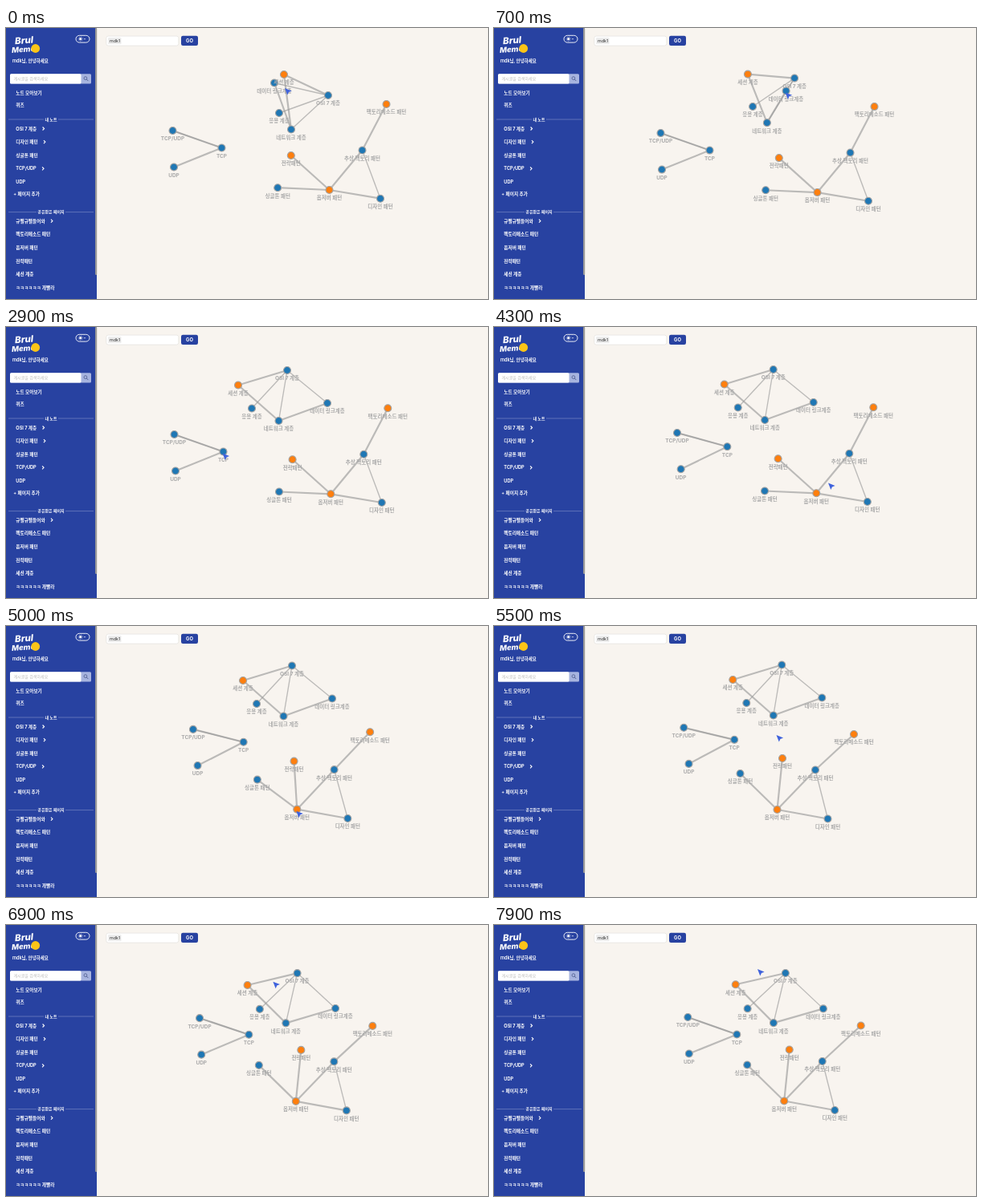
Write an HTML page that moves like this. It is 600 px wide and 338 px high and loops after 8 s.

```html
<!DOCTYPE html>
<html lang="ko">
<head>
<meta charset="utf-8">
<title>Note graph</title>
<style>
  html, body { margin: 0; width: 100%; height: 100%; overflow: hidden; background: #f8f4ef; }
  svg { display: block; width: 600px; height: 338px; }
  text { font-family: Inter, "Noto Sans CJK KR", "Noto Sans CJK", sans-serif; white-space: pre; }
</style>
</head>
<body>
<svg id="stage" viewBox="0 0 600 338" xmlns="http://www.w3.org/2000/svg"></svg>
<script>
const NS = 'http://www.w3.org/2000/svg';
const stage = document.getElementById('stage');
const LOOP = 8000, STEP = 100;
const NAVY = '#2842a1', BLUE = '#1f77b4', ORANGE = '#ff7f0e';
const THICK = 2.2, THIN = 1.35;

function add(tag, attrs, parent = stage) {
  const el = document.createElementNS(NS, tag);
  for (const key in attrs) el.setAttribute(key, attrs[key]);
  parent.appendChild(el);
  return el;
}

// y is the visual middle of the text
function label(text, x, y, size, extra = {}, parent = stage) {
  const el = add('text', { x, y: y + size * 0.37, 'font-size': size, fill: '#fff', ...extra }, parent);
  el.textContent = text;
  return el;
}

const rect = (x, y, width, height, fill, rx = 0, extra = {}) =>
  add('rect', { x, y, width, height, fill, rx, ...extra });

const bold = { 'font-weight': 700 };

function drawSidebar() {
  rect(0, 0, 113, 338, NAVY);
  rect(111, 0, 2.2, 308, '#989898', 1);

  const logo = { 'font-weight': 800, 'font-style': 'italic' };
  label('Brul', 11, 16, 11.5, { ...logo, transform: 'rotate(-4 11 16)' });
  label('Memo', 7, 27.5, 9.5, { ...logo, transform: 'rotate(-4 7 27)' });
  add('circle', { cx: 36.7, cy: 25.5, r: 5.4, fill: '#fcc417' });

  rect(87, 9.3, 17, 8.8, 'none', 4.4, { stroke: '#fff', 'stroke-width': 0.9 });
  add('circle', { cx: 92.7, cy: 13.7, r: 1.6, fill: '#fff' });
  add('circle', { cx: 92.7, cy: 13.7, r: 2.6, fill: 'none', stroke: '#fff', 'stroke-width': 0.8, 'stroke-dasharray': '.7 1.34' });
  add('path', { d: 'M97 13.7h2', stroke: '#fff', 'stroke-width': 0.7 });

  label('mdk님, 안녕하세요', 8, 41, 5.5, { 'font-weight': 600 });
  rect(5, 57.2, 101, 12.3, '#a7b4df', 1.5);
  rect(5, 57.2, 88.5, 12.3, '#fff', 1.5);
  label('게시글을 검색하세요', 9.5, 63.2, 5, { fill: '#bcbcbc' });
  add('circle', { cx: 98.9, cy: 62.6, r: 1.9, fill: 'none', stroke: '#4c5a8c', 'stroke-width': 0.8 });
  add('path', { d: 'M100.3 64l2 2', stroke: '#4c5a8c', 'stroke-width': 0.9 });

  // A trailing ">" becomes a chevron
  const menu = (y, step, items) => items.forEach((item, i) => {
    const mid = y + i * step;
    const text = label(item.replace('>', ''), 12.3, mid, 5.65, bold);
    if (!item.endsWith('>')) return;
    const x = 12.3 + text.getComputedTextLength() + 7.3;
    add('path', { d: `M${x} ${mid - 2}l2 2l-2 2`, fill: 'none', stroke: '#fff', 'stroke-width': 1.1 });
  });
  const divider = (text, y, half) => {
    add('path', { d: `M3 ${y}H${56 - half}M${56 + half} ${y}H109`, stroke: '#8493cb', 'stroke-width': 0.6 });
    label(text, 56, y, 5, { 'text-anchor': 'middle', ...bold });
  };

  menu(80.5, 15, ['노트 모아보기', '퀴즈']);
  divider('내 노트', 114, 9);
  menu(125.5, 16.6, ['OSI 7 계층>', '디자인 패턴>', '싱글톤 패턴', 'TCP/UDP>', 'UDP']);
  label('+ 페이지 추가', 9.3, 207, 5.65, { 'font-weight': 600 });
  divider('공유받은 페이지', 229.6, 18);
  menu(240.7, 16.65, ['규펠규펠들어와>', '팩토리메소드 패턴', '옵저버 패턴', '전략패턴', '세션 계층', 'ㅋㅋㅋㅋㅋㅋ 개빨라']);
}

function drawToolbar() {
  rect(124.8, 10.1, 90, 12, '#fff', 2.5, { stroke: '#e3e1dd', 'stroke-width': 0.7 });
  rect(127, 12.1, 16.5, 8, '#ececec', 1.2);
  label('mdk1', 129, 16, 5.4, { fill: '#333' });
  rect(218, 9.8, 21, 12.1, NAVY, 2.2);
  label('GO', 228.5, 16, 5.8, { 'text-anchor': 'middle', ...bold });
}

// Each cluster is a shape that travels as a whole: motion = [time, dx, dy, degrees].
// During `morph` its nodes go from their first place to their second one;
// nudges = [node, time, span, dx, dy] pull one node aside for a while.
const clusters = [
  {
    morph: [0, 1350],
    motion: [[0, 0, 0, 0], [1100, 0, -8, 0], [1400, 0, 0, 0], [2900, 0, 0, 0], [4300, -2.3, -1, 0],
      [5300, 8.3, -5.5, 0], [5800, 8.3, -5.5, 0], [6300, 11, 6.7, 0], [7100, 10.5, 5, 4]],
    nudges: [[0, 1400, 1200, 0, -6.5], [3, 1400, 1200, -18.5, 6], [4, 1400, 1200, -14, 4], [3, 6300, 500, -4, 13]],
    nodes: [
      ['세션 계층', ORANGE, [346, 58], [289, 72.5]],
      ['OSI 7 계층', BLUE, [401, 84], [350, 54]],
      ['응용 계층', BLUE, [340, 106], [306, 101.5]],
      ['네트워크 계층', BLUE, [355, 126.5], [339.5, 117]],
      ['데이터 링크계층', BLUE, [334, 68.5], [400, 95]],
    ],
    links: [[0, 1, THICK], [0, 3, THICK], [4, 3, THICK], [1, 2, THIN], [1, 3, THIN], [1, 4, THIN]],
  },
  {
    morph: [4350, 5250],
    motion: [[0, 0, 0, 0], [900, 0, 3.5, 0], [1400, 5, 5.3, 0], [2900, 1.8, 6.3, 0], [4300, -1.2, 5.3, 0],
      [5400, 1, 4.5, 0], [5500, 0, 0, 0], [7100, 8.7, -9.5, 0]],
    nudges: [],
    nodes: [
      ['팩토리메소드 패턴', ORANGE, [473.5, 95], [448, 135]],
      ['추상 팩토리 패턴', BLUE, [443.5, 152.5], [400, 179.5]],
      ['디자인 패턴', BLUE, [466, 212.7], [415.5, 240.5]],
      ['옵저버 패턴', ORANGE, [402.5, 202], [352.5, 229]],
      ['싱글톤 패턴', BLUE, [338.2, 199.2], [306.5, 184]],
      ['전략패턴', ORANGE, [354.8, 159], [359, 165]],
    ],
    links: [[0, 1, THICK], [1, 3, THICK], [3, 2, THICK], [3, 4, THICK], [3, 5, THICK], [1, 2, THIN]],
  },
  {
    motion: [[0, 0, 0, 0], [900, 0, 3.5, 0], [1400, 5, 5, 0], [2900, 2, 6, 0], [3650, 22, 2.5, -4], [4350, 22, 2.5, -4],
      [5500, 31, -3.5, -6], [6300, 34.3, -7.5, -5.5], [7100, 33.8, -13, 0]],
    nudges: [],
    nodes: [
      ['TCP/UDP', BLUE, [207.5, 128]],
      ['TCP', BLUE, [268.5, 149.5]],
      ['UDP', BLUE, [209, 173.5]],
    ],
    links: [[0, 1, THICK], [0, 1, THIN], [2, 1, THICK]],
  },
];

// The pointer visits nodes, which it holds while they move, and free spots
const visits = [
  [0, [347, 75]], [600, '데이터 링크계층'], [1600, '데이터 링크계층'], [2800, 'TCP'], [3750, 'TCP'],
  [4300, [416, 194.5]], [4400, '옵저버 패턴'], [5350, '옵저버 패턴'], [5500, [351.5, 136]],
  [5800, '네트워크 계층'], [6450, '네트워크 계층'], [7100, [328, 55]],
];

const clamp = u => Math.min(1, Math.max(0, u));
const smooth = u => { u = clamp(u); return u * u * (3 - 2 * u); };
const mix = (a, b, u) => a.map((v, i) => v + (b[i] - v) * u);

// Eased value at t of keys [time, value]
function sample(keys, t) {
  const next = keys.findIndex(key => key[0] > t);
  if (next < 0) return keys[keys.length - 1][1];
  const [t0, a] = keys[next - 1], [t1, b] = keys[next];
  return mix(a, b, smooth((t - t0) / (t1 - t0)));
}

function place(cluster, t) {
  const { nodes, nudges, morph = [0, 1] } = cluster;
  const progress = smooth((t - morph[0]) / (morph[1] - morph[0]));
  const [dx, dy, degrees] = sample(cluster.motion.map(([time, ...pose]) => [time, pose]), t);
  const points = nodes.map(([, , from, to = from]) => mix(from, to, progress));
  for (const [i, time, span, nx, ny] of nudges) {
    const pull = smooth(1 - Math.abs(t - time) / span);
    points[i] = [points[i][0] + nx * pull, points[i][1] + ny * pull];
  }
  const mean = axis => points.reduce((sum, p) => sum + p[axis], 0) / points.length;
  const cx = mean(0), cy = mean(1);
  const cos = Math.cos(degrees * Math.PI / 180), sin = Math.sin(degrees * Math.PI / 180);
  return points.map(([x, y]) => [
    cx + dx + (x - cx) * cos - (y - cy) * sin,
    cy + dy + (x - cx) * sin + (y - cy) * cos,
  ]);
}

drawSidebar();
drawToolbar();

const linkLayer = add('g', { stroke: '#999', 'stroke-opacity': 0.64 });
const nodeLayer = add('g', { stroke: '#a3a3a3', 'stroke-width': 1.1 });
const textLayer = add('g', { 'text-anchor': 'middle', ...bold });

for (const cluster of clusters) {
  cluster.lines = cluster.links.map(([, , width]) => add('line', { 'stroke-width': width }, linkLayer));
  cluster.dots = cluster.nodes.map(([name, fill]) => [
    add('circle', { r: 4.5, fill }, nodeLayer),
    label(name, 0, 10, 6.5, { fill: '#aaa' }, textLayer),
  ]);
}
const arrow = add('path', { d: 'M0 0L8.6 3.4L4.9 4.9L3.3 8.6Z', fill: '#3f62dc' });

const move = (el, [x, y]) => el.setAttribute('transform', `translate(${x.toFixed(2)} ${y.toFixed(2)})`);

function render(t) {
  const spots = {};
  for (const cluster of clusters) {
    const points = place(cluster, t);
    points.forEach((point, i) => {
      spots[cluster.nodes[i][0]] = point;
      cluster.dots[i].forEach(el => move(el, point));
    });
    cluster.links.forEach(([a, b], i) => {
      const [x1, y1] = points[a], [x2, y2] = points[b];
      Object.entries({ x1, y1, x2, y2 }).forEach(([key, v]) => cluster.lines[i].setAttribute(key, v.toFixed(2)));
    });
  }
  const held = name => [spots[name][0] - 1, spots[name][1] + 2];
  move(arrow, sample(visits.map(([time, spot]) => [time, Array.isArray(spot) ? spot : held(spot)]), t));
}

const start = performance.now();
function tick() {
  const t = (performance.now() - start) % LOOP;
  render(Math.floor(t / STEP) * STEP);
  requestAnimationFrame(tick);
}
tick();
</script>
</body>
</html>
```
